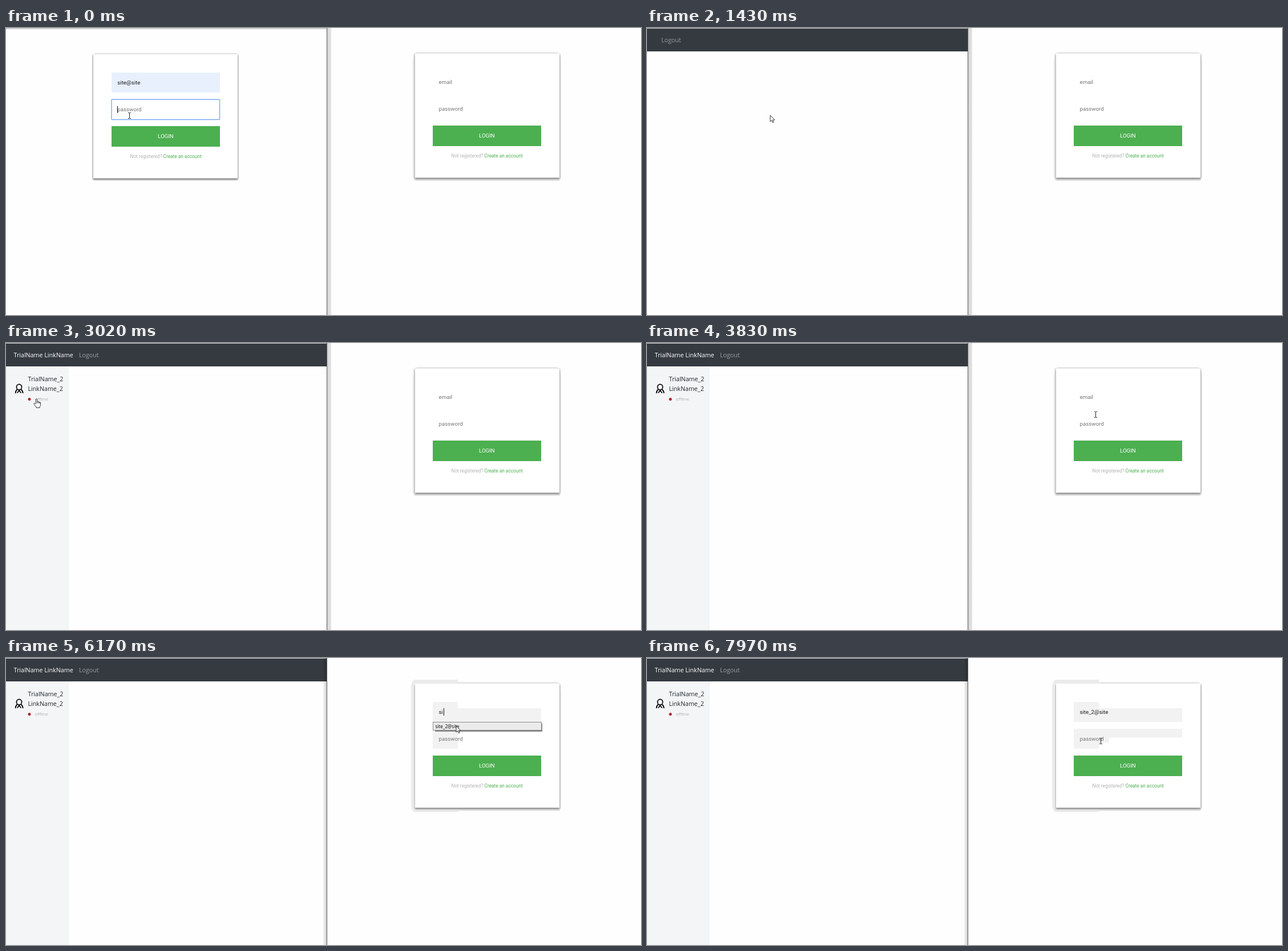
Animation of 1113 by 503 pixels, one loop 8000 ms. Source, as an HTML page:

```html
<!DOCTYPE html>
<html lang="en">
<head>
<meta charset="utf-8">
<title>Login demo</title>
<style>
  html, body { margin: 0; width: 100%; height: 100%; overflow: hidden; background: #fefefe; }
  svg { display: block; width: 1113px; height: 503px; }
  text { font: 9.7px Roboto, Arial, sans-serif; fill: #757575; white-space: pre; }
  .dark { fill: #1c1c1c; }
  .white { fill: #fff; }
  .note { font-size: 8.25px; fill: #b3b3b3; }
  .link { font-size: 8.3px; fill: #4caf50; }
  .ui { font: 10.7px "Open Sans", "Noto Sans", sans-serif; fill: #212529; }
  .ui.brand { fill: #fff; }
  .ui.out { fill: #9a9da0; }
  .ui.state { font-size: 7.9px; fill: #b0b0b0; }
  .ui.option { font-size: 8.1px; fill: #000; }
  .field { fill: #f2f2f2; }
  .caret { fill: #111; }
</style>
</head>
<body>
<svg viewBox="0 0 1113 503">
  <defs>
    <filter id="soft" x="-10%" y="-10%" width="120%" height="120%"><feGaussianBlur stdDeviation="1.7"/></filter>
    <linearGradient id="fadeRight"><stop stop-color="#bbb"/><stop offset="1" stop-color="#fefefe"/></linearGradient>
    <linearGradient id="fadeLeft"><stop stop-color="#000" stop-opacity="0"/><stop offset="1" stop-color="#000" stop-opacity=".2"/></linearGradient>
    <linearGradient id="edge"><stop stop-color="#d2d2d2"/><stop offset="1" stop-color="#e6e6e6"/></linearGradient>
    <g id="card">
      <rect x="717" y="47.5" width="253" height="217" fill="#000" opacity=".5" filter="url(#soft)"/>
      <rect x="717" y="45" width="253" height="217.5" fill="#fff"/>
    </g>
    <g id="action">
      <rect x="748" y="171" width="190" height="36" fill="#4caf50"/>
      <text class="white" x="829" y="192">LOGIN</text>
      <text class="note" x="780.5" y="227">Not registered?</text>
      <text class="link" x="838.5" y="227">Create an account</text>
    </g>
  </defs>

  <!-- right window -->
  <path d="M721 42H965L972 45L973 60V262L970 268H716L713 262V60L714 45Z" fill="#e7e7e7"/>
  <path data-on="4720-8000" d="M716 38H792V270H716Q711 268 710 258V50Q711 40 716 38Z" fill="#ebebeb"/>
  <use href="#card"/>
  <g class="field">
    <path data-on="4720-8000" d="M748 77h44v35h-44zM748 124h44v35h-44z"/>
    <path data-on="4720-5700" d="M792 101h4v11h-4zM792 124h4l-2 9h-2z"/>
    <rect data-on="5700-8000" x="792" y="88" width="146" height="24"/>
    <rect data-on="5700-6480" x="792" y="124" width="146" height="6"/>
    <rect data-on="6480-8000" x="792" y="124" width="146" height="15.5"/>
    <rect data-on="7260-8000" x="792" y="139" width="18" height="9"/>
  </g>
  <use href="#action"/>
  <text data-on="0-5700" x="758.5" y="97.5">email</text>
  <text id="mail" class="dark" x="758.5" y="97.5"></text>
  <text x="758.5" y="144.5">password</text>
  <g class="caret">
    <rect data-on="4810-5340" x="759" y="88" width="1" height="13"/>
    <rect data-on="5700-5800" x="763" y="88" width="1" height="13"/>
    <rect data-on="5800-6320" x="767" y="88" width="1" height="13"/>
    <rect data-on="7460-7970" x="759" y="135" width="1" height="13"/>
  </g>
  <g data-on="5850-7010">
    <rect x="752" y="115" width="188" height="14" fill="#858585"/>
    <rect x="748.5" y="112.5" width="190" height="14" fill="#fff" stroke="#8c8c8c"/>
    <rect data-on="6120-6530 6790-7010" x="749" y="113" width="189" height="13" fill="#ebebeb"/>
    <text class="ui option" x="752.5" y="122.5">site_2@site</text>
  </g>

  <!-- left window: login form -->
  <g data-on="0-1430">
    <path d="M156 44H404L408 47V264L406 267H153L151 264V47Z" fill="#e2e2e2"/>
    <use href="#card" x="-564" y="1"/>
    <use href="#action" x="-563" y="1"/>
    <rect x="185" y="78" width="190" height="35" fill="#e8f0fe"/>
    <text class="dark" x="195.3" y="99">site@site</text>
    <rect x="185" y="125.3" width="189.5" height="35.2" rx="1" fill="#fff" stroke="#76a9f5" stroke-width="1.4"/>
    <text data-on="0-570" x="195.3" y="146">password</text>
    <text id="dots" class="dark" x="195.3" y="146"></text>
    <rect id="pwCaret" class="caret" data-on="0-330 570-1430" x="195" y="137" width="1" height="12"/>
    <rect y="1" width="562" height="1" fill="#c4c4c4"/>
  </g>
  <rect width="562" height="1" fill="#d6d6d6"/>

  <!-- left window: chat page -->
  <g data-on="1430-8000">
    <rect y="1" width="562" height="40" fill="#343a40"/>
    <text class="ui out" data-on="1430-1460" x="25" y="25">Logout</text>
    <g data-on="1460-8000">
      <text class="ui brand" x="13.5" y="25">TrialName LinkName</text>
      <text class="ui out" x="128" y="25">Logout</text>
    </g>
    <g data-on="1500-8000">
      <rect y="41" width="110" height="462" fill="#f3f5f7"/>
      <g fill="none" stroke="#000" stroke-width="1.7" stroke-linecap="round">
        <ellipse cx="23" cy="77.2" rx="4.6" ry="4.9"/>
        <path d="M19.6 81.5Q16.8 83.5 16.6 87.5M26.4 81.5Q29.4 83.5 29.6 87.5M20 87L23 83.4L26 87"/>
      </g>
      <text class="ui" x="38.5" y="67">TrialName_2</text>
      <text class="ui" x="38.5" y="84">LinkName_2</text>
      <circle cx="41" cy="98.5" r="2.5" fill="#a62b2b"/>
      <text class="ui state" x="50.5" y="101.3">offline</text>
    </g>
  </g>

  <!-- window border -->
  <rect data-on="0-4700" x="563" width="7" height="503" fill="url(#edge)"/>
  <rect data-on="4700-4780" x="563" width="5" height="503" fill="url(#fadeRight)"/>
  <rect data-on="4780-8000" x="555" width="7" height="503" fill="url(#fadeLeft)"/>
  <rect x="562" width="1" height="503" fill="#5c5c5c"/>

  <g id="cursor">
    <path data-kind="beam" d="M-2.5 -5H-.8L0 -4.5L.8 -5H2.5M0 -4.5V4.5M-2.5 5H-.8L0 4.5L.8 5H2.5" fill="none" stroke="#222"/>
    <path data-kind="arrow" d="M.5 .5V11.5L3 9.2L4.8 13.3L6.6 12.5L4.9 8.6H8.4Z" fill="#fff" stroke="#222" stroke-width=".9"/>
    <path data-kind="hand" d="M-1.2 9V1.2Q0 -.5 1.2 1.2V5.2Q2.6 4.4 3.4 5.6Q4.8 5 5.4 6.3Q7 6 7 7.6V11Q6.8 13 5.6 14.2V16H-.5V14.6L-4.6 9.6Q-5 7.6 -3 8Z M1.2 5.2V8M3.4 5.6V8.4M5.4 6.3V8.6" fill="#fff" stroke="#222" stroke-width=".9"/>
  </g>
</svg>
<script>
  const LOOP = 8000;
  const $ = id => document.getElementById(id);
  const keyTimes = [570, 645, 720, 950, 1010, 1070];

  // time, x, y, and the pointer shape from then on
  const path = [
    [0, 216, 153, 'beam'], [1429, 216, 153], [1430, 215, 152, 'arrow'], [2550, 215, 152],
    [2740, 105, 112, 'hand'], [2900, 28, 108], [3020, 53, 97], [3110, 53, 97], [3230, 78, 103],
    [3710, 78, 103, 'arrow'], [3770, 400, 58], [3830, 786, 125, 'beam'], [4050, 786, 125],
    [4210, 792, 121], [4580, 792, 121], [4720, 789, 100], [6030, 789, 100],
    [6080, 789, 113, 'arrow'], [6170, 788, 118], [6480, 788, 118], [6530, 790, 128, 'beam'],
    [6580, 791, 137], [6740, 791, 137], [6790, 795, 128, 'arrow'], [6900, 798, 121],
    [7010, 798, 121], [7120, 798, 126, 'beam'], [7460, 795, 145], [LOOP, 795, 145]
  ];

  const timed = [...document.querySelectorAll('[data-on]')].map(el => ({
    el, spans: el.dataset.on.split(' ').map(s => s.split('-').map(Number))
  }));
  const shapes = [...document.querySelectorAll('[data-kind]')];

  function moveCursor(t) {
    const next = path.findIndex(p => p[0] > t);
    const a = path[next - 1], b = path[next];
    const k = (t - a[0]) / (b[0] - a[0]);
    const mix = i => Math.round(a[i] + (b[i] - a[i]) * k) + .5;
    const kind = path.slice(0, next).reverse().find(p => p[3])[3];
    $('cursor').setAttribute('transform', `translate(${mix(1)} ${mix(2)})`);
    for (const s of shapes) s.style.display = s.dataset.kind === kind ? '' : 'none';
  }

  function draw(t) {
    for (const { el, spans } of timed)
      el.style.display = spans.some(([a, b]) => t >= a && t < b) ? '' : 'none';
    const typed = keyTimes.filter(k => t >= k).length;
    $('dots').textContent = '•'.repeat(typed);
    $('pwCaret').setAttribute('x', Math.floor(195 + typed * 3.3));
    $('mail').textContent = t < 5700 ? '' : t < 5800 ? 's' : t < 7010 ? 'si' : 'site_2@site';
    moveCursor(t);
  }

  const start = performance.now();
  function tick() {
    draw((performance.now() - start) % LOOP);
    requestAnimationFrame(tick);
  }
  tick();
</script>
</body>
</html>
```
